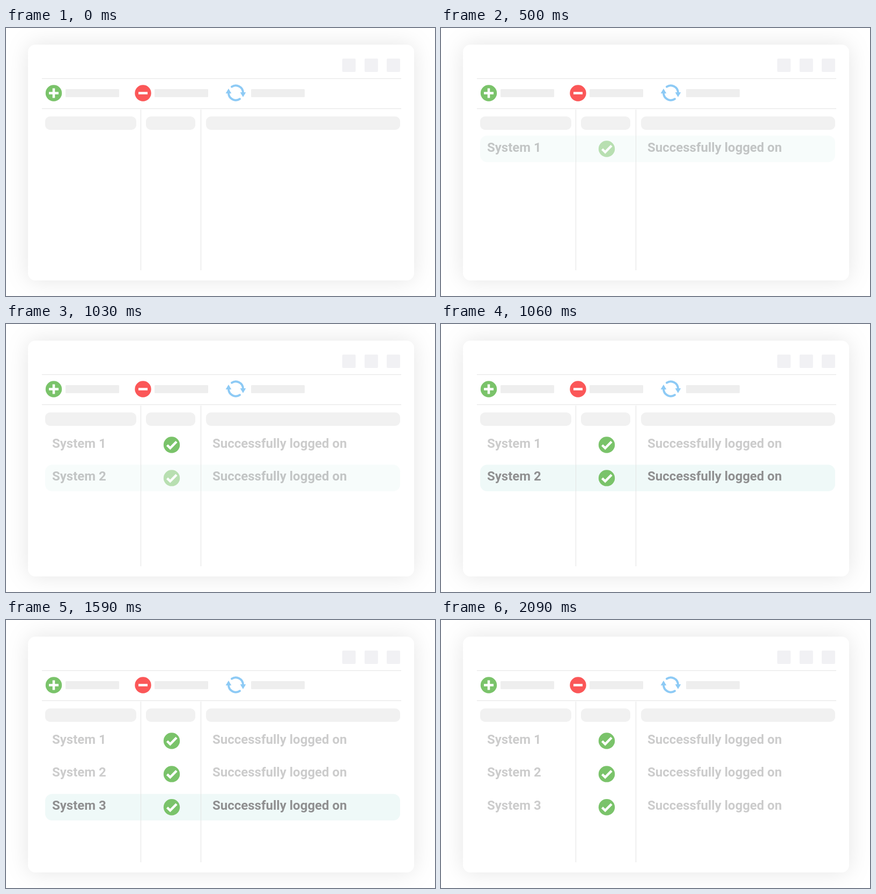
An HTML page for the animation above (2590 ms loop, 800 px wide and 500 px high).

```html
<!DOCTYPE html>
<html lang="en">
<head>
<meta charset="utf-8">
<title>System log</title>
<style>
  html, body { margin: 0; width: 100%; height: 100%; overflow: hidden; background: #fff; }
  svg { display: block; width: 100%; height: 100%; }
  .card { fill: #fff; filter: drop-shadow(0 0 20px rgba(0, 0, 0, .1)); }
  .rule { stroke: #e3e3e3; }
  .bar { fill: #eee; }
  .head { fill: #f1f1f1; }
  .tool { fill: #f1f1f4; }
  .band { fill: #eff9f8; }
  .green { fill: #7ac36a; }
  .red { fill: #fb5758; }
  .mark { fill: none; stroke: #fff; stroke-width: 4.5; }
  .blue { fill: #8dcaf5; }
  .arc { fill: none; stroke: #8dcaf5; stroke-width: 4; stroke-linecap: round; }
  text { font: 700 24px Roboto, sans-serif; fill: #8f8f90; }
</style>
</head>
<body>
<svg viewBox="0 0 800 500">
  <rect class="card" x="41" y="31" width="720" height="440" rx="14"/>
  <g id="boxes"></g>
  <g id="bands"></g>
  <path class="rule" d="M67 94.5H737M67 150.5H737M251.5 152V452M363.5 152V452"/>

  <circle class="green" cx="89" cy="121.5" r="15.2"/>
  <path class="mark" d="M80 121.5H98M89 112.5V130.5"/>
  <circle class="red" cx="255.5" cy="121.5" r="15.2"/>
  <path class="mark" d="M247 121.5H264"/>

  <g id="refresh">
    <path class="arc" d="M415 121A13.5 13.5 0 0 0 436 132.3"/>
    <path class="blue" d="M415 113L420.3 122H409.7Z"/>
  </g>
  <use href="#refresh" transform="rotate(180 428.5 121)"/>
  <g id="rows"></g>
</svg>
<script>
const LOOP = 2590, FIRST = 500, STEP = 530, FADE = 30, PITCH = 61.9;
const get = id => document.getElementById(id);

const box = (cls, x, y, width, height, radius) =>
  `<rect class="${cls}" x="${x}" y="${y}" width="${width}" height="${height}" rx="${radius}"/>`;

get('boxes').innerHTML =
  [627, 668.7, 710].map(x => box('tool', x, 57, 25, 25, 2)).join('') +
  [111, 277, 457].map(x => box('bar', x, 114, 100, 15, 1.5)).join('') +
  [[73, 170], [261, 92], [373, 362]].map(([x, w]) => box('head', x, 165, w, 25, 9)).join('');

const rows = [0, 1, 2];
get('bands').innerHTML = rows.map(i => box('band', 73, 200.7 + i * PITCH, 662, 49.5, 13)).join('');
get('rows').innerHTML = rows.map(i => `
  <g transform="translate(0 ${i * PITCH})">
    <g><text x="86" y="230.5">System ${i + 1}</text>
    <text x="385" y="230.5">Successfully logged on</text></g>
    <g><circle class="green" cx="309" cy="225.5" r="15.2"/>
    <path class="mark" d="M300.5 226L306.2 231.5L318 219.5"/></g>
  </g>`).join('');

// Each row appears in two steps, is highlighted, then dims as the next one arrives.
function draw(now) {
  const time = now % LOOP;
  rows.forEach(i => {
    const age = time - FIRST - i * STEP;
    const shown = age < 0 ? 0 : age < FADE ? 0.5 : 1;
    const past = age >= STEP;
    const [label, check] = get('rows').children[i].children;
    get('bands').children[i].style.opacity = past ? 0 : shown;
    label.style.opacity = past ? 0.45 : shown;
    check.style.opacity = shown;
  });
}

const start = performance.now();
function tick() {
  draw(performance.now() - start);
  requestAnimationFrame(tick);
}
tick();
</script>
</body>
</html>
```
